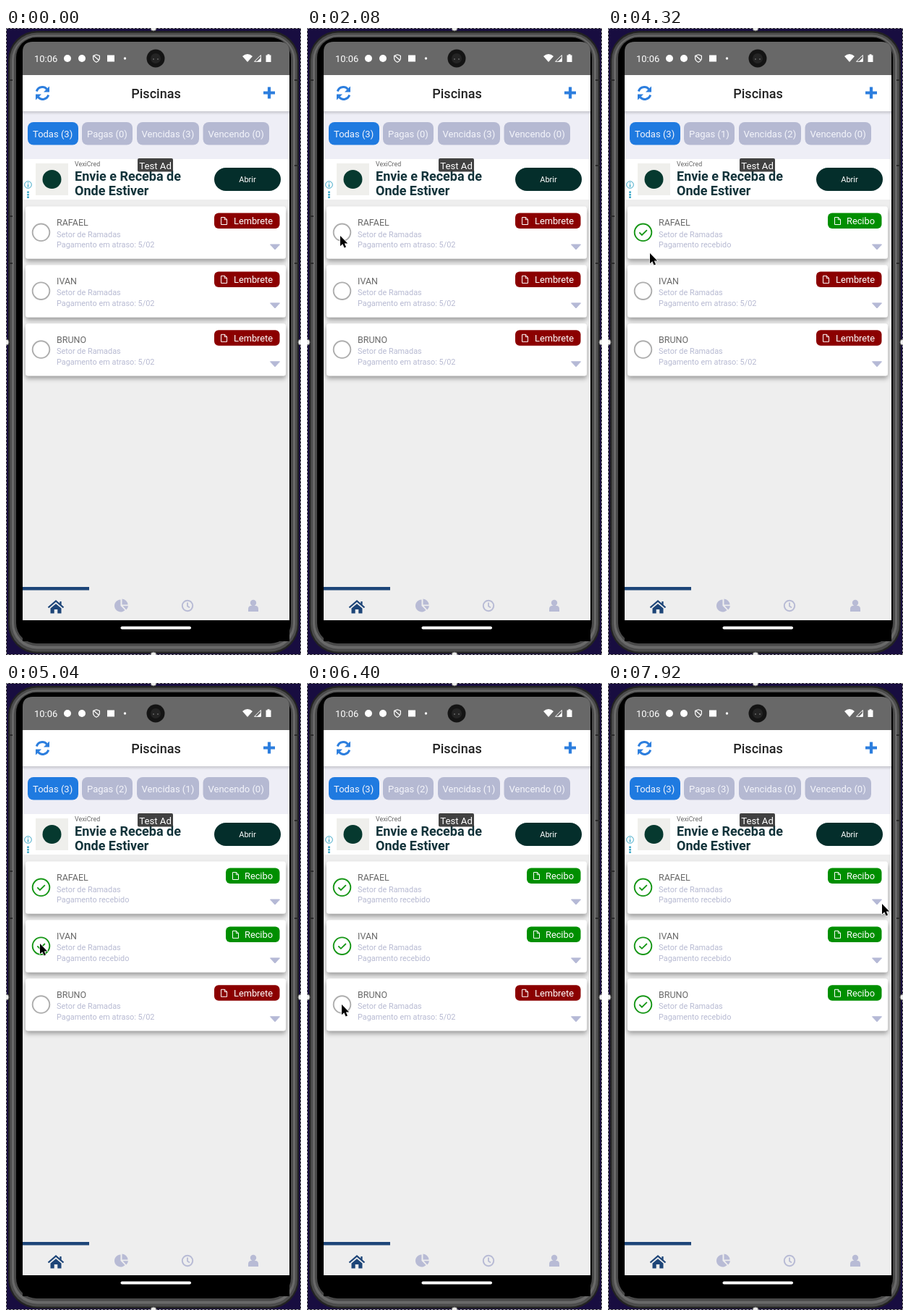
An HTML page that plays this animation: 408 by 866 pixels, repeating every 8000 ms.

```html
<!DOCTYPE html>
<html lang="pt">
<head>
<meta charset="utf-8">
<title>Piscinas</title>
<style>
  html, body { margin: 0; width: 100%; height: 100%; overflow: hidden; background: #180d40; }
  svg { display: block; width: 100vw; height: 100vh; }
  text { font-family: Roboto, sans-serif; white-space: pre; }
  .chip { font-size: 13px; fill: #f4f5fb; }
  .name { font-size: 12.5px; fill: #6a6a6a; }
  .note { font-size: 10.9px; fill: #b7bad2; }
  .badge { font-size: 12.8px; fill: #fff; }
</style>
</head>
<body>
<svg viewBox="0 0 408 866">
  <defs>
    <filter id="shadow" x="-5%" y="-15%" width="110%" height="150%">
      <feDropShadow dx="0" dy="4" stdDeviation="3.3" flood-opacity=".34"/>
    </filter>
    <linearGradient id="fade" x2="0" y2="1">
      <stop stop-color="#000" stop-opacity=".16"/><stop offset="1" stop-color="#000" stop-opacity="0"/>
    </linearGradient>
  </defs>

  <!-- Phone body: nested rims from dark edge to black bezel -->
  <rect width="408" height="866" fill="#180d40"/>
  <rect x="3" y="4" width="402" height="860" rx="40" fill="#222"/>
  <rect x="5" y="6.5" width="398" height="855" rx="38" fill="#4c4c4c"/>
  <rect x="8" y="9.5" width="392" height="848" rx="35" fill="#696969"/>
  <rect x="11" y="11.5" width="386" height="842" rx="32" fill="#484848"/>
  <rect x="14" y="13" width="380" height="837" rx="28"/>
  <path d="M3 72h6M3 260h6M3 325h6M399 72h6M399 190h6M399 325h6" stroke="#2b2b2b" stroke-width="2"/>
  <g fill="none">
    <path d="M.5 .5H407.5V865.5H.5Z" stroke="#111"/>
    <path d="M.5 .5H407.5V865.5H.5Z" stroke="#bbb" stroke-dasharray="3 2"/>
  </g>
  <g fill="#eee" stroke="#777">
    <circle cx="204" r="4"/><circle cy="434" r="4"/><circle cx="408" cy="434" r="4"/><circle cx="204" cy="866" r="4"/>
  </g>

  <!-- Status bar -->
  <path d="M23 65V33Q23 19 37 19H378Q392 19 392 33V65Z" fill="#686868"/>
  <circle cx="207" cy="42" r="12.5" fill="#141414"/>
  <circle cx="207" cy="42" r="7" fill="#242424"/>
  <path d="M203 43h2M209 43h2" stroke="#555" stroke-width="2"/>
  <text x="39" y="46.5" font-size="13" fill="#fff">10:06</text>
  <g fill="#fff">
    <circle cx="85" cy="42" r="5"/><circle cx="105" cy="42" r="5"/>
    <rect x="140" y="37.5" width="10" height="9"/>
    <circle cx="164.5" cy="42" r="1.7"/>
    <path d="M327 39Q334 33 341 39L334 47ZM359.5 37.5h2v-1.3h3v1.3h2V47h-7Z"/>
  </g>
  <path d="M125 36.8l4.4 1.7v3q0 3.7-4.4 5.8-4.4-2.1-4.4-5.8v-3ZM121.5 38.5l7 6" fill="none" stroke="#fff" stroke-width="1.2"/>
  <path d="M343.5 46.3L352.3 37.5V46.3Z" fill="none" stroke="#fff"/>
  <path d="M347 46.5L352.5 41V46.5Z" fill="#fff"/>

  <!-- Page -->
  <rect x="23" y="65" width="369" height="753" fill="#eee"/>
  <rect x="23" y="115" width="369" height="66" fill="#eeeef6"/>
  <rect x="23" y="65" width="369" height="50" fill="#fff"/>
  <rect x="23" y="115" width="369" height="5" fill="url(#fade)"/>
  <text x="207.5" y="97" font-size="18" font-weight="500" fill="#222" text-anchor="middle">Piscinas</text>
  <g fill="none" stroke="#2c7ede" stroke-width="3">
    <path d="M42.3 87.5A8.3 8.3 0 0 1 56.5 84.5M58.7 92.5A8.3 8.3 0 0 1 44.5 95.5"/>
    <path d="M364 81.5v16M356 89.5h16" stroke-width="4.2"/>
  </g>
  <path d="M60 80.5V88.5H52ZM41 99.5V91.5H49Z" fill="#2c7ede"/>
  <g id="chips"></g>

  <!-- Banner -->
  <rect x="23" y="181" width="369" height="56" fill="#fff"/>
  <rect x="41" y="187" width="45" height="44" fill="#efefec"/>
  <circle cx="63.5" cy="209" r="13" fill="#06392f"/>
  <text x="95" y="191" font-size="8.9" fill="#666">VexiCred</text>
  <g font-size="18" font-weight="700" fill="#12333a">
    <text x="95" y="211">Envie e Receba de</text>
    <text x="95" y="230.5">Onde Estiver</text>
  </g>
  <rect x="288" y="193" width="92" height="32" rx="16" fill="#042e2b"/>
  <text x="334" y="212.8" font-size="11" fill="#fff" text-anchor="middle">Abrir</text>
  <circle cx="30.5" cy="216.5" r="4.8" fill="#fff" stroke="#35a5c5"/>
  <path d="M30.5 213.2v1.4M30.5 215.8v4" stroke="#35a5c5" stroke-width="1.4"/>
  <path d="M30.5 225.5v2.4M30.5 229v2.4M30.5 232.5v2.4" stroke="#35a5c5" stroke-width="2.6"/>
  <rect x="182" y="180" width="49" height="18.5" rx="2" fill="#333" fill-opacity=".93"/>
  <text x="206.5" y="194.5" font-size="13.2" fill="#fff" text-anchor="middle">Test Ad</text>

  <g id="cards"></g>

  <!-- Bottom navigation -->
  <rect x="23" y="772" width="92" height="4.5" fill="#1d4578"/>
  <path d="M58.5 800.5L69 791.5 79.5 800.5M75.5 792v5" fill="none" stroke="#1d4578" stroke-width="2.3"/>
  <path d="M61.5 801.5L69 795.3 76.5 801.5V808.5H71.3V803H66.7V808.5H61.5Z" fill="#1d4578"/>
  <g fill="#b8bbd5">
    <path d="M158.5 789.5V798L164.5 804A8.5 8.5 0 1 1 158.5 789.5ZM160.5 788.5A8.5 8.5 0 0 1 168.5 796.5H160.5ZM161.5 798.3H169A8.5 8.5 0 0 1 166.3 803.5Z"/>
    <circle cx="342" cy="794" r="4.2"/>
    <path d="M335 806V802.5Q335 798 339 798H345Q349 798 349 802.5V806Z"/>
  </g>
  <path d="M251 793.5V798.5L254 800.5" fill="none" stroke="#b8bbd5" stroke-width="1.8"/>
  <circle cx="251" cy="798" r="7.2" fill="none" stroke="#b8bbd5" stroke-width="2"/>
  <rect x="23" y="818" width="369" height="29"/>
  <rect x="158.5" y="826.5" width="97.5" height="4" rx="2" fill="#fff"/>

  <path id="cursor" d="M0 0V14.3L3.3 11.3 5.6 16.6 8 15.6 5.8 10.4H10.2Z" stroke="#fff" stroke-width="1.2" paint-order="stroke"/>
</svg>
<script>
  const LOOP = 8000, STEP = 80;
  const people = [
    { name: "RAFAEL", paidAt: 3520 },
    { name: "IVAN", paidAt: 4880 },
    { name: "BRUNO", paidAt: 6480 },
  ];
  // Pointer stops: time, x, y
  const stops = [
    [400, 409, 500], [1520, 46, 287], [3120, 46, 287], [3280, 47, 282], [4000, 47, 282],
    [4320, 58, 311], [4640, 47, 360], [5680, 47, 360], [6080, 48, 444], [7360, 48, 444], [7920, 379, 305],
  ];
  const byId = id => document.getElementById(id);

  function chip(x, width, textX, label, active) {
    return `<rect x="${x}" y="130" width="${width}" height="31.5" rx="8" fill="${active ? "#1f7ae0" : "#b5b9d2"}"/>
      <text class="chip" x="${textX}" y="151">${label}</text>`;
  }

  function drawChips(paid) {
    byId("chips").innerHTML =
      chip(30, 70, 37, "Todas (3)", true) +
      chip(105, 70, 112, `Pagas (${paid})`) +
      chip(181, 86, 187.5, `Vencidas (${people.length - paid})`) +
      chip(272.5, 91.5, 279.5, "Vencendo (0)");
  }

  function card({ name }, index, paid) {
    const left = paid ? 304 : 288;
    return `<g transform="translate(0 ${index * 80.9})">
      <rect x="27" y="246.5" width="360" height="72" rx="3.5" fill="#fff" filter="url(#shadow)"/>
      <circle cx="48.5" cy="282.3" r="11.8" fill="none" stroke="${paid ? "#159615" : "#adadad"}" stroke-width="1.9"/>
      ${paid ? '<path d="M43.3 282.4l3.6 3.5 7-6.8" fill="none" stroke="#159615" stroke-width="1.8"/>' : ""}
      <text class="name" x="70" y="273">${name}</text>
      <text class="note" x="70" y="288.5">Setor de Ramadas</text>
      <text class="note" x="70" y="303.3">${paid ? "Pagamento recebido" : "Pagamento em atraso: 5/02"}</text>
      <rect x="${left}" y="255.5" width="${378.5 - left}" height="21.5" rx="6" fill="${paid ? "#008f00" : "#8b0000"}"/>
      <path transform="translate(${left + 9} 261)" d="M.5 .5H5.5L8.5 3.5V10.5H.5ZM5.3 .5V3.7H8.5" fill="none" stroke="#fff"/>
      <text class="badge" x="${left + (paid ? 26 : 27)}" y="271">${paid ? "Recibo" : "Lembrete"}</text>
      <path d="M365.5 299H378.5L372 306Z" fill="#b5b9d6" stroke="#b5b9d6" stroke-linejoin="round"/>
    </g>`;
  }

  function drawCursor(time) {
    const cursor = byId("cursor");
    const next = stops.findIndex(stop => stop[0] > time);
    cursor.setAttribute("visibility", next === 0 ? "hidden" : "visible");
    if (next === 0) return;
    const to = stops.at(next), from = stops.at(next - 1);
    const u = Math.min(1, (time - from[0]) / (to[0] - from[0]));
    const [x, y] = next < 0 ? to.slice(1) : [1, 2].map(i => from[i] + (to[i] - from[i]) * u);
    cursor.setAttribute("transform", `translate(${x} ${y})`);
  }

  let shownPaid = -1;
  function render(now) {
    const time = Math.floor(now % LOOP / STEP) * STEP;
    const paid = people.filter(person => time >= person.paidAt).length;
    if (paid !== shownPaid) {
      drawChips(paid);
      byId("cards").innerHTML = people.map((person, i) => card(person, i, i < paid)).join("");
      shownPaid = paid;
    }
    drawCursor(time);
  }

  const start = performance.now();
  function tick() {
    render(performance.now() - start);
    requestAnimationFrame(tick);
  }
  tick();
</script>
</body>
</html>
```
